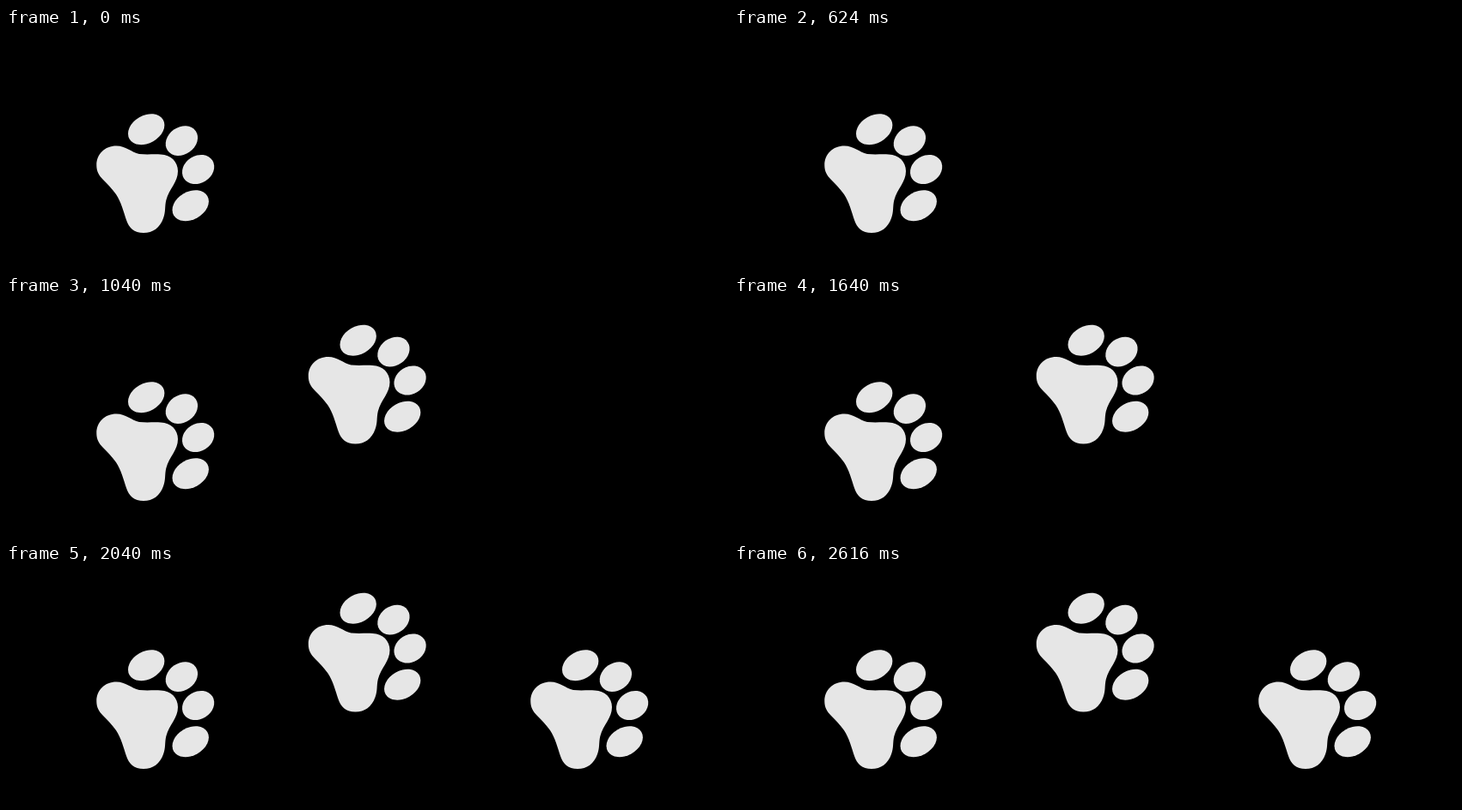
An HTML page for the animation above (3000 ms loop, 840x280 px).

```html
<!DOCTYPE html>
<html lang="en">
<head>
<meta charset="utf-8">
<title>Paw prints</title>
<style>
  html, body { margin: 0; width: 100%; height: 100%; overflow: hidden; background: #000; }
  svg { display: block; width: 840px; height: 280px; }
</style>
</head>
<body>
<svg viewBox="0 0 840 280" fill="#e6e6e6">
  <defs>
    <g id="paw">
      <ellipse rx="22.6" ry="16.2" transform="translate(163.2 118.2) rotate(-30)"/>
      <ellipse rx="19.9" ry="15.9" transform="translate(204.4 131.6) rotate(-35)"/>
      <ellipse rx="19.6" ry="15.9" transform="translate(223.6 165) rotate(-32)"/>
      <ellipse rx="22.6" ry="16.2" transform="translate(214.7 207.2) rotate(-30)"/>
      <path d="M105.3 160 C105.3 147 115 137.5 128.5 137.5 C139 137.5 146 145 155 147
        C164 148 171 147 180 147.5 C192 148 200 156 200 167 C200 180 190 187 186.3 201
        C184.5 209 186 214 183 222 C179 233 171 239 160 239 C149 239 143 233 140 224
        C137 215 134 203 128 194 C123 187 118.5 182.5 113 177 C108 172 105.3 167 105.3 160 Z"/>
    </g>
  </defs>
</svg>
<script>
  const LOOP = 3000;
  const prints = [
    { x: 0, y: 0, at: 0 },
    { x: 246.5, y: -66.5, at: 1040 },
    { x: 505, y: 0, at: 2040 }
  ];
  const svg = document.querySelector('svg');

  for (const print of prints) {
    print.node = document.createElementNS(svg.namespaceURI, 'use');
    print.node.setAttribute('href', '#paw');
    print.node.setAttribute('x', print.x);
    print.node.setAttribute('y', print.y);
    svg.append(print.node);
  }

  function draw(now) {
    const time = now % LOOP;
    for (const { node, at } of prints) {
      node.style.visibility = time >= at ? 'visible' : 'hidden';
    }
  }

  const start = performance.now();
  function tick() {
    draw(performance.now() - start);
    requestAnimationFrame(tick);
  }
  tick();
</script>
</body>
</html>
```
